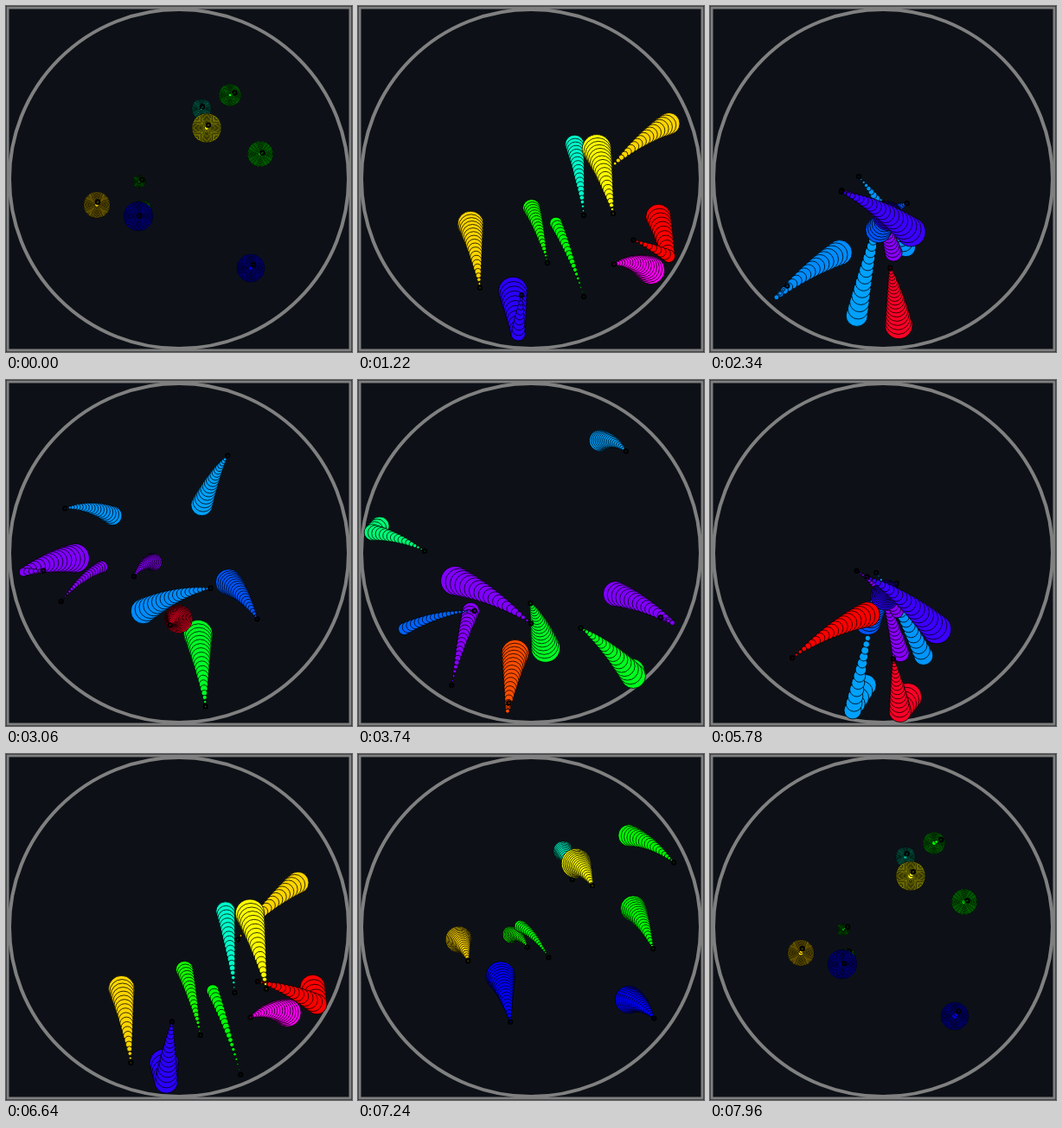
Write an HTML page with a canvas that moves like this. It is 400x400 px and loops after 8.06 s.

```html
<!DOCTYPE html>
<html>
<head>
<meta charset="utf-8">
<style>
html, body { margin: 0; width: 100%; height: 100%; overflow: hidden; background: #0d1117; }
canvas { display: block; }
</style>
</head>
<body>
<canvas id="stage" width="400" height="400"></canvas>
<script>
const ctx = document.getElementById('stage').getContext('2d');
const LOOP = 8060, STEP = 20, HALF = 200, LEAD = 2;
const GRAVITY = 0.107, TRAIL = 20, MID = 200, RIM = 196;

// Start state of a ball; each bounce takes the next hue.
const ball = (r, x, y, vx, vy, ...hues) => ({ r, path: simulate(r, x, y, vx, vy, hues) });

const balls = [
  ball(11, 226, 119, 0.556, -1.418, 168, 205, 148),
  ball(12.5, 259, 103, 2.72, -1.51, 120, 50, 202),
  ball(10, 158, 235, 0.968, -2.386, 115, 272),
  ball(15, 105, 230, 0.571, -1.85, 50, 220, 127),
  ball(7, 154, 203, 1.7, -1.26, 122, 272, 217),
  ball(16.8, 153, 243, 0.595, -0.376, 240, 250, 129),
  ball(16, 283, 303, 1.52, -2.02, 240, 302, 351, 18),
  ball(14.5, 294, 171, 1.21, -0.7, 120, 0, 207, 270),
  ball(16.8, 232, 141, 1, -1.8, 60, 254, 270),
];

// Free fall; at the rim a ball keeps its speed and heads for the middle.
function simulate(r, x, y, vx, vy, hues) {
  const path = [];
  let bounces = 0;
  for (let s = 0; s < HALF + LEAD; s++) {
    path.push({ x, y, hue: hues[bounces % hues.length] });
    x += vx;
    y += vy + GRAVITY / 2;
    vy += GRAVITY;
    const dx = MID - x, dy = MID - y, dist = Math.hypot(dx, dy);
    if (dist > RIM - r) {
      const speed = Math.hypot(vx, vy);
      vx = speed * dx / dist;
      vy = speed * dy / dist;
      bounces++;
    }
  }
  return path;
}

function circle(x, y, r) {
  ctx.beginPath();
  ctx.arc(x, y, r, 0, 2 * Math.PI);
}

function drawBall({ r, path }, s) {
  const head = path[s];
  ctx.fillStyle = `hsl(${head.hue}, 100%, 50%)`;
  ctx.strokeStyle = '#000';
  ctx.lineWidth = 0.8;
  for (let k = TRAIL - 1; k >= 0; k--) {
    const { x, y } = path[Math.max(0, s - k)];
    circle(x, y, r * (k + 1) / TRAIL);
    ctx.fill();
    ctx.stroke();
  }
  ctx.lineWidth = 2;
  circle(head.x, head.y, 2.2);
  ctx.stroke();
}

function draw(now) {
  const i = Math.min(2 * HALF - 2, Math.floor(now % LOOP / STEP));
  const s = LEAD + (i < HALF ? i : 2 * HALF - 1 - i);
  ctx.fillStyle = '#0d1117';
  ctx.fillRect(0, 0, 400, 400);
  ctx.strokeStyle = '#808080';
  ctx.lineWidth = 3;
  ctx.strokeRect(2, 2, 396, 396);
  ctx.lineWidth = 4;
  circle(MID, MID, RIM);
  ctx.stroke();
  for (const b of balls) drawBall(b, s);
}

const start = performance.now();
function tick() {
  draw(performance.now() - start);
  requestAnimationFrame(tick);
}
tick();
</script>
</body>
</html>
```
